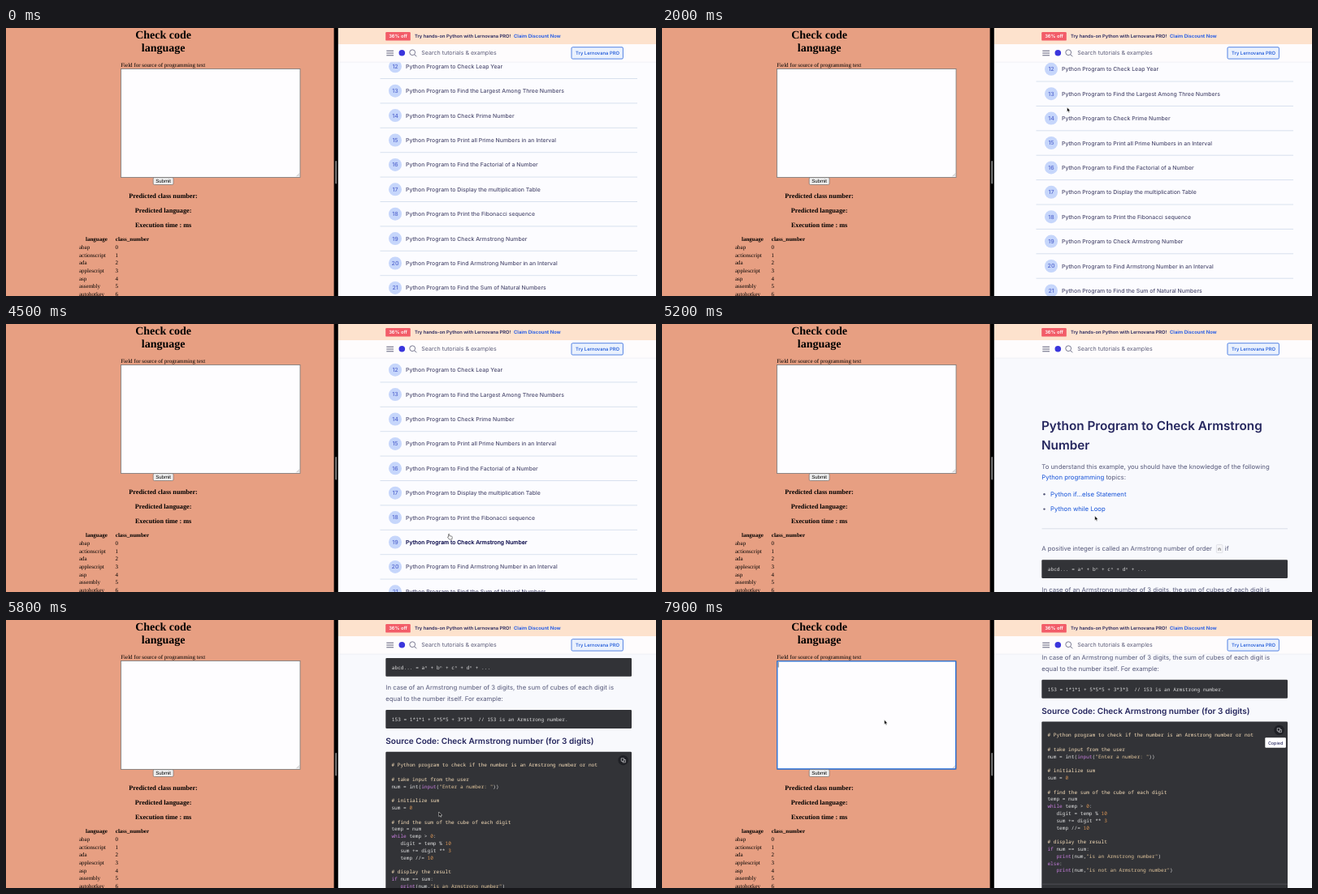
Recreate the animation shown at these times as an HTML page. Size 800 by 331 pixels, loop 8 s.

```html
<!DOCTYPE html>
<html lang="en">
<head>
<meta charset="utf-8">
<title>Check code language</title>
<style>
  html, body { margin: 0; width: 100%; height: 100%; overflow: hidden; background: #e79f82; }
  svg { display: block; width: 100vw; height: 100vh; text-rendering: geometricPrecision; }
  text { white-space: pre; }
  .serif { font: 7px "Liberation Serif", serif; }
  .sans { font: 7px Inter, sans-serif; }
  .mono { font: 6.14px "Noto Sans Mono", monospace; fill: #dcdcdc; }
  .bold { font-weight: 700; }
  .semi { font-weight: 600; }
  .medium { font-weight: 500; }
  .mid { text-anchor: middle; }
  .h1 { font-size: 14px; }
  .h3 { font-size: 8.2px; }
  .body { font-size: 7.76px; fill: #555879; }
  .title { font-size: 15.3px; fill: #25265e; }
  .sub { font-size: 10.07px; fill: #25265e; }
  .item { font-size: 6.9px; fill: #4d4c70; }
  .item.hover { fill: #10104f; stroke: #10104f; stroke-width: .18; }
  .num { fill: #5367cf; }
  .link { fill: #1653d8; }
  .comment { fill: #f5dcb8; }
  .key { fill: #c27bd8; }
  .str { fill: #dfc39a; }
  .lit { fill: #d69355; }
</style>
</head>
<body>
<svg id="stage" viewBox="0 0 800 331" preserveAspectRatio="none"></svg>
<script>
const stage = document.getElementById('stage');
const LOOP = 8000, ROW = 30.4, PAGE_SWAP = 4700;

const text = (x, y, cls, str) => `<text x="${x}" y="${y}" class="${cls}">${str}</text>`;
const rect = (x, y, w, h, fill, more = '') =>
  `<rect x="${x}" y="${y}" width="${w}" height="${h}" fill="${fill}" ${more}/>`;
const path = (d, stroke, width, more = '') =>
  `<path d="${d}" fill="none" stroke="${stroke}" stroke-width="${width}" ${more}/>`;

function formPanel() {
  const mid = (y, cls, str) => text(193.6, y, `serif bold mid ${cls}`, str);
  const languages = ['abap', 'actionscript', 'ada', 'applescript', 'asp', 'assembly', 'autohotkey'];
  return rect(0, 0, 404, 331, '#e79f82') +
    mid(13, 'h1', 'Check code') + mid(29.3, 'h1', 'language') +
    text(141.2, 48, 'serif', 'Field for source of programming text') +
    rect(141.5, 50.5, 220.5, 134, '#fefdff', 'stroke="#777" stroke-width=".8"') +
    path('M357.5 183.3L361 179.8M359.5 183.3L361 181.8', '#777', .5) +
    `<g id="focus">${rect(141.8, 50.8, 219.8, 133.2, 'none', 'stroke="#2b70d8" stroke-width="1.3" rx=".8"')}
      ${rect(142.8, 52, .6, 6.5, '#222')}</g>` +
    rect(181.2, 184.7, 24.8, 8.8, '#efefef', 'stroke="#666" stroke-width=".6" rx="1.4"') +
    `<text x="193.6" y="191.2" class="mid" font-family="Liberation Sans, sans-serif" font-size="6">Submit</text>` +
    mid(209.6, 'h3', 'Predicted class number:') +
    mid(227.6, 'h3', 'Predicted language:') +
    mid(245.7, 'h3', 'Execution time : ms') +
    text(98, 263.2, 'serif bold', 'language') + text(134.8, 263.2, 'serif bold', 'class_number') +
    languages.map((name, i) => {
      const y = 272.9 + 9.7 * i;
      return text(90, y, 'serif', name) + text(134.6, y, 'serif', i);
    }).join('');
}

function listPage() {
  const topics = ['Check Leap Year', 'Find the Largest Among Three Numbers', 'Check Prime Number',
    'Print all Prime Numbers in an Interval', 'Find the Factorial of a Number',
    'Display the multiplication Table', 'Print the Fibonacci sequence', 'Check Armstrong Number',
    'Find Armstrong Number in an Interval', 'Find the Sum of Natural Numbers'];
  return topics.map((topic, i) => {
    const y = 47.3 + ROW * i, n = 12 + i;
    return `<circle cx="479" cy="${y}" r="8" fill="#c6d6fb"/>` +
      text(479, y + 2.4, 'sans medium mid num', n) +
      `<text id="item${n}" x="492" y="${y + 2.5}" class="sans medium item">Python Program to ${topic}</text>` +
      path(`M460.5 ${y + ROW / 2}H777`, '#cfdaea', .8);
  }).join('');
}

// Inline marks: k keyword, s string, n number, c comment
const CLASSES = { k: 'key', s: 'str', n: 'lit', c: 'comment' };
const paint = line => line.replace(/\{(\w) (.*?)\}/g,
  (_, c, str) => `<tspan class="${CLASSES[c]}">${str}</tspan>`);

const CODE = `{c # Python program to check if the number is an Armstrong number or not}

{c # take input from the user}
num = int({k input}({s "Enter a number: "}))

{c # initialize sum}
sum = {n 0}

{c # find the sum of the cube of each digit}
temp = num
{k while} temp &gt; {n 0}:
   digit = temp % {n 10}
   sum += digit ** {n 3}
   temp //= {n 10}

{c # display the result}
{k if} num == sum:
   {k print}(num,{s "is an Armstrong number"})
{k else}:
   {k print}(num,{s "is not an Armstrong number"})`;

function articlePage() {
  const body = (x, y, str, cls = '') => text(x, y, `sans body ${cls}`, str);
  const box = (y, h) => rect(467.3, y, 302.7, h, '#323337', 'rx="1.2"');
  const bullet = (y, str) => `<circle cx="470.5" cy="${y - 2.6}" r="1.2" fill="#555879"/>` +
    body(478, y, str, 'link');
  return text(467, 131, 'sans semi title', 'Python Program to Check Armstrong') +
    text(467, 154.7, 'sans semi title', 'Number') +
    body(467.3, 179.2, 'To understand this example, you should have the knowledge of the following') +
    body(467.3, 192.3, '<tspan class="link">Python programming</tspan> topics:') +
    bullet(212.8, 'Python if...else Statement') + bullet(231.2, 'Python while Loop') +
    path('M467.5 252.8H770', '#d5d9e4', .8) +
    body(467.3, 280.2, 'A positive integer is called an Armstrong number of order') +
    rect(682.4, 272.6, 7.6, 10, '#f5f5f8', 'stroke="#d3d5de" stroke-width=".6" rx="1"') +
    `<text x="686.2" y="279.6" class="mono mid" style="fill:#444">n</text>` +
    body(692.8, 280.2, 'if') +
    box(291.2, 22.8) + text(474.8, 304.9, 'mono', 'abcd... = aⁿ + bⁿ + cⁿ + dⁿ + ...') +
    body(467.3, 330.8, 'In case of an Armstrong number of 3 digits, the sum of cubes of each digit is') +
    body(467.3, 344, 'equal to the number itself. For example:') +
    box(355.2, 23) +
    text(474.8, 369, 'mono', '153 = 1*1*1 + 5*5*5 + 3*3*3  // 153 is an Armstrong number.') +
    text(467.3, 397.6, 'sans semi sub', 'Source Code: Check Armstrong number (for 3 digits)') +
    box(407, 260) + path('M467.5 607.7H770', '#5b5b60', .7) +
    CODE.split('\n').map((line, i) => text(474.4, 425.6 + 8.8 * i, 'mono', paint(line))).join('') +
    `<circle id="copy" cx="759.6" cy="417.5" r="6.2" fill="#1f2025"/>` +
    path('M757.2 415.2h3.4v3.4h-3.4zM759 418.6v1.6h3.4v-3.4h-1.8', '#e4e4e8', .6) +
    `<g id="copied">${rect(742.3, 426.8, 25.6, 12.4, '#fff', 'rx="1"')}
      <text x="755.1" y="435" class="sans medium mid" style="font-size:5.4px" fill="#25265e">Copied</text></g>`;
}

function siteHeader() {
  const small = (x, y, size, fill, str, cls = 'semi') =>
    `<text x="${x}" y="${y}" class="sans ${cls}" style="font-size:${size}px" fill="${fill}">${str}</text>`;
  return rect(409, 20, 391, 21.8, '#fefcfd') + rect(409, 41.8, 391, .6, '#e9e9f1') +
    rect(409, 0, 391, 20, '#fde2cd') +
    rect(467.2, 5, 30.6, 10.6, '#f25c68', 'rx="1.2"') +
    small(482.5, 12.4, 5.85, '#fff', '36% off', 'semi mid') +
    small(503, 12.4, 5.78, '#25265e', 'Try hands-on Python with Lernovana PRO!') +
    small(625, 12.4, 5.93, '#1653e8', 'Claim Discount Now') +
    path('M468.3 28.2H477M468.3 31H477M468.3 33.8H477', '#4a4b69', .9) +
    '<circle cx="487.3" cy="30.8" r="3.8" fill="#3a35dc"/>' +
    '<circle cx="500.2" cy="30.2" r="3.4" fill="none" stroke="#5a5b78" stroke-width=".8"/>' +
    path('M502.7 32.7L505.3 35.3', '#5a5b78', .8) +
    small(511.3, 33.4, 7.05, '#5a5b78', 'Search tutorials &amp; examples', '') +
    rect(696, 23.7, 63.4, 14.4, '#eaf1fd', 'stroke="#2c66dd" stroke-width=".8" rx="1.4"') +
    small(728, 33, 5.85, '#1653d8', 'Try Lernovana PRO', 'medium mid');
}

stage.innerHTML = formPanel() +
  rect(404, 0, 396, 331, '#fcfcff', 'id="paper"') +
  `<g id="list">${listPage()}</g><g id="article">${articlePage()}</g>` + siteHeader() +
  rect(403.6, 0, 5.2, 331, '#000') + rect(405.2, 164, 1.9, 28.5, '#7d7d7d', 'rx=".9"') +
  `<g id="cursor" stroke="#fff" stroke-width=".5" stroke-linejoin="round">
    <path id="arrow" fill="#000" d="M0 0V5.6L1.3 4.5L2.2 6.4L3.1 6L2.3 4.2H4Z"/>
    <path id="hand" fill="#fff" stroke="#111" d="M-.6 .4Q0 -.5 .6 .4V2.4L3.4 3Q4.2 3.2 4.1 4L3.7 6.8H.4L-1.6 4.2Q-1.7 3.4 -.6 3.8Z"/>
  </g>`;

const part = id => document.getElementById(id);
const show = (id, on) => part(id).style.display = on ? '' : 'none';

// Keys are [time, ...values]; each leg eases in and out
function at(keys, t) {
  const i = keys.findIndex(k => k[0] > t);
  if (i < 0) return keys[keys.length - 1].slice(1);
  if (i === 0) return keys[0].slice(1);
  const [a, b] = [keys[i - 1], keys[i]];
  const p = (t - a[0]) / (b[0] - a[0]), e = p * p * (3 - 2 * p);
  return a.slice(1).map((v, j) => v + (b[j + 1] - v) * e);
}

const listScroll = [[1800, 0], [2000, 3.5], [2200, 3.5], [2700, 9.4]];
const articleScroll = [[5200, 0], [5600, -240], [5700, -240], [6200, -281.5]];
const pointer = [[2000, 498.5, 98], [2200, 498.5, 98], [2800, 549.5, 267], [4400, 549.5, 267],
  [4700, 532.7, 237], [5900, 532.7, 237], [6600, 759.8, 136], [7200, 759.8, 136], [7700, 273.6, 123.3]];

function draw(now) {
  const t = Math.floor(now % LOOP / 100) * 100;
  const reading = t >= PAGE_SWAP;
  const overLink = t >= 2700 && t < 4600, overCopy = t >= 6600 && t < 7300;
  show('list', !reading);
  show('article', reading);
  part('paper').setAttribute('fill', reading ? '#f8f9fd' : '#fcfcff');
  part('list').setAttribute('transform', `translate(0 ${at(listScroll, t)})`);
  part('article').setAttribute('transform', `translate(0 ${at(articleScroll, t)})`);
  part('item19').classList.toggle('hover', overLink);
  part('copy').setAttribute('fill', overCopy ? '#08080b' : '#1f2025');
  show('copied', t >= 7000);
  show('focus', t >= 7800);
  show('cursor', t >= 1900);
  show('hand', overLink || overCopy);
  show('arrow', !overLink && !overCopy);
  part('cursor').setAttribute('transform', `translate(${at(pointer, t)})`);
}

const start = performance.now();
function tick() {
  draw(performance.now() - start);
  requestAnimationFrame(tick);
}
tick();
</script>
</body>
</html>
```
